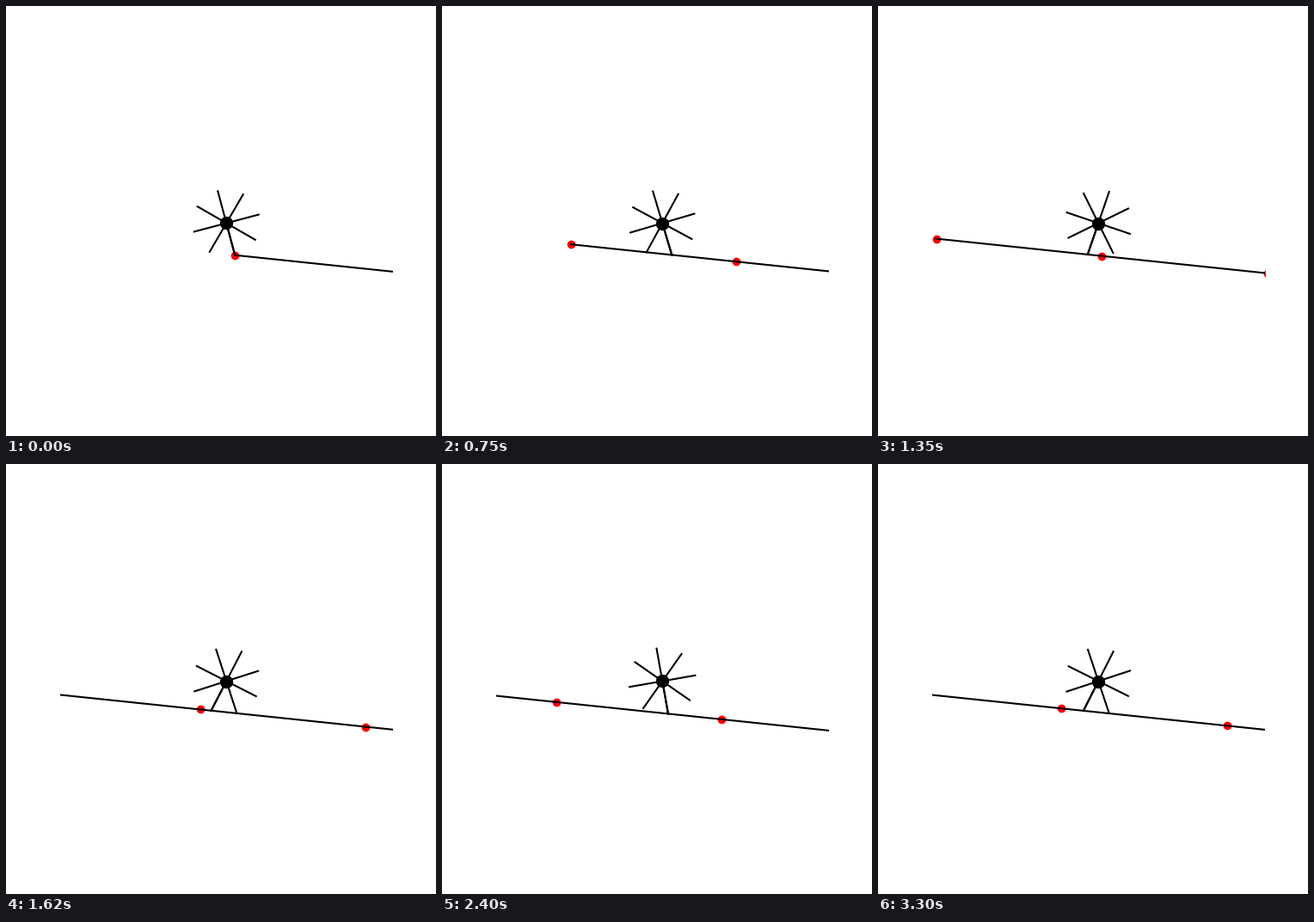
Write a matplotlib script that moves like this. It is 500 by 500 pixels and loops after 3330 ms.

```python
import numpy as np
import matplotlib.pyplot as plt
from matplotlib.animation import FuncAnimation

G = 9.81
SLOPE = np.radians(6)
HALF = np.pi / 8              # half the angle between spokes
STEP = 0.762                  # distance between footholds along the slope
DT, SUB = 0.1, 20
SAMPLES = [5, 6] + [7] * 4 + [8] * 9   # poses per step, speeding down to a steady gait
VIEW = 5


def on_slope(s):
    return s * np.cos(SLOPE), -s * np.sin(SLOPE)


def advance(theta, omega):
    """Swing the stance leg as an inverted pendulum for DT."""
    h = DT / SUB

    def rate(y):
        return np.array([y[1], G * np.sin(y[0])])

    y = np.array([theta, omega])
    for _ in range(SUB):
        a = rate(y)
        b = rate(y + h / 2 * a)
        c = rate(y + h / 2 * b)
        d = rate(y + h * c)
        y = y + h / 6 * (a + 2 * b + 2 * c + d)
    return y


def walk(theta, omega):
    """Return (foothold distance, leg angle) for every frame."""
    poses = []
    for step, count in enumerate(SAMPLES):
        drop = np.cos(theta) - np.cos(SLOPE + HALF)
        impact = np.sqrt(omega ** 2 + 2 * G * drop)
        for _ in range(count):
            poses.append((step * STEP, theta))
            theta, omega = advance(theta, omega)
        theta, omega = SLOPE - HALF, impact * np.cos(2 * HALF)
    return poses


poses = walk(-0.26, 1.82)

fig, ax = plt.subplots(figsize=(5, 5), dpi=100)
ax.axis("off")
ax.plot(*on_slope(np.arange(0, 41, 5)), "ro")
ax.plot(*on_slope(np.array([0, 40])), "k-")
# the stance leg is drawn twice, as first and last spoke
turns = np.linspace(0, 2 * np.pi, 9)
spokes = [ax.plot([], [], "k-")[0] for _ in turns]
hub, = ax.plot([], [], "ko", markersize=10)


def update(i):
    s, theta = poses[i]
    fx, fy = on_slope(s)
    x, y = fx + np.sin(theta), fy + np.cos(theta)
    for spoke, turn in zip(spokes, turns):
        a = theta + turn
        spoke.set_data([x, x - np.sin(a)], [y, y - np.cos(a)])
    hub.set_data([x], [y])
    ax.set_xlim(x - VIEW, x + VIEW)
    ax.set_ylim(y - VIEW, y + VIEW)
    return [*spokes, hub]


anim = FuncAnimation(fig, update, frames=len(poses), interval=30,
                     repeat=True, repeat_delay=0, blit=False)
plt.show()
```
